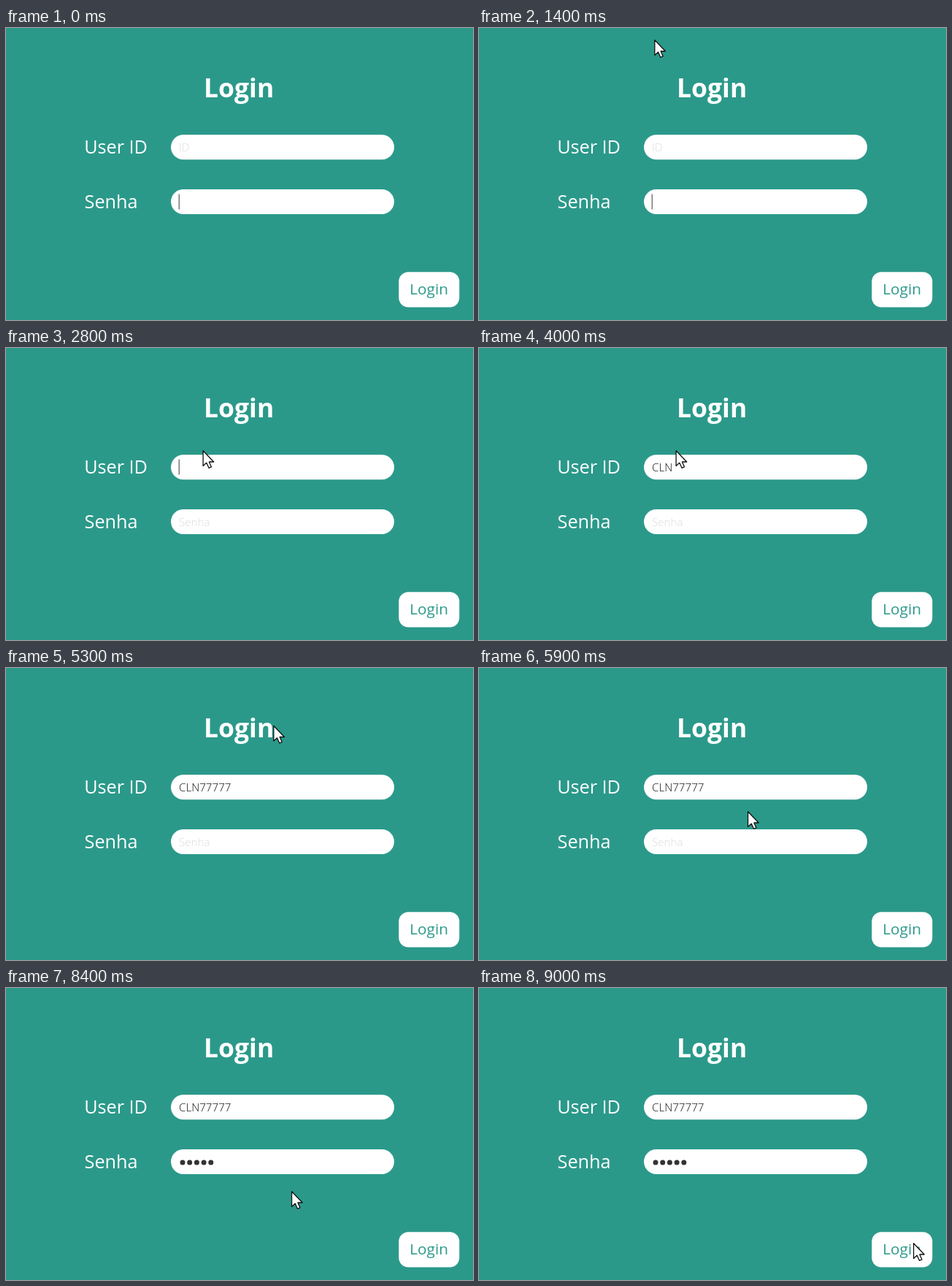
Animation of 640x400 px, one loop 9100 ms. Source, as an HTML page:

```html
<!DOCTYPE html>
<html lang="pt">
<head>
<meta charset="utf-8">
<title>Login</title>
<style>
  html, body { margin: 0; width: 100%; height: 100%; overflow: hidden; background: #2b998a; }
  svg { display: block; width: 640px; height: 400px; font-family: "Open Sans", "Noto Sans", sans-serif; }
  text { fill: #fff; white-space: pre; }
  .title { font-size: 35.5px; font-weight: 700; }
  .label { font-size: 25.2px; }
  .button { font-size: 20.8px; fill: #2b998a; }
  .value, .hint { font-size: 15.2px; font-weight: 300; }
  .value { fill: #111; }
  .hint { fill: #d9dedb; }
</style>
</head>
<body>
<svg viewBox="0 0 640 400">
  <rect width="640" height="400" fill="#2b998a"/>
  <text class="title" x="271" y="95">Login</text>
  <text class="label" x="107.2" y="172">User ID</text>
  <text class="label" x="107.6" y="246.5">Senha</text>
  <g fill="#fff">
    <rect x="226" y="146.3" width="306" height="34" rx="17"/>
    <rect x="226" y="221" width="306" height="34" rx="17"/>
    <rect x="538.3" y="334.3" width="83" height="48.2" rx="13"/>
  </g>
  <text class="button" x="553.2" y="365">Login</text>
  <text class="hint" id="idHint" x="237" y="169">ID</text>
  <text class="hint" id="passHint" x="237" y="244">Senha</text>
  <text class="value" id="idValue" x="237" y="169"></text>
  <g id="dots" fill="#333"></g>
  <rect id="caret" width="1.3" height="21" fill="#666"/>
  <g id="pointer">
    <path id="arrow" d="M.6 .8V21.6L5.3 17.3 8.6 24.4 12 22.9 8.9 16H15.2Z"
          fill="#fff" stroke="#111" stroke-width="1.3" stroke-linejoin="round"/>
    <path id="beam" d="M-4 -10H-1.2L0 -9 1.2 -10H4M0 -9V9M-4 10H-1.2L0 9 1.2 10H4"
          fill="none" stroke="#111" stroke-width="1.4"/>
  </g>
</svg>
<script>
const LOOP = 9100, STEP = 100, BLINK = 500;
const LETTERS = "CLN", DIGITS = "77777", DOT_GAP = 9.7;

// Evenly spaced key presses
const keys = (count, start, gap) => Array.from({ length: count }, (_, i) => start + i * gap);
const idKeys = [...keys(LETTERS.length, 3200, 150), ...keys(DIGITS.length, 4200, 200)];
const passKeys = keys(5, 7170, 125);

const idFocus = { from: 2500, to: 5000 };
const passFocus = { from: 6500, to: 8100 };

// The pointer rests between moves
const ENTRY = { end: 300, x: 11, y: 0 };
const MOVES = [
  { start: 300, end: 600, x: 191, y: 2 },
  { start: 1300, end: 1700, x: 506, y: 90 },
  { start: 1700, end: 2300, x: 275, y: 176 },
  { start: 2300, end: 2800, x: 269.5, y: 140 },
  { start: 5200, end: 5400, x: 463, y: 17 },
  { start: 5500, end: 5700, x: 572, y: 342 },
  { start: 5700, end: 5900, x: 368, y: 196 },
  { start: 5900, end: 6600, x: 368, y: 237 },
  { start: 8000, end: 8400, x: 391, y: 278 },
  { start: 8400, end: 9000, x: 595, y: 349 }
];

const el = id => document.getElementById(id);
const show = (node, on) => node.style.display = on ? "" : "none";
const typed = (times, t) => times.filter(time => time <= t).length;
const within = (t, span) => t >= span.from && t < span.to;
const ease = k => k * k * (3 - 2 * k);

const dots = passKeys.map((_, i) => {
  const dot = document.createElementNS("http://www.w3.org/2000/svg", "circle");
  dot.setAttribute("cx", 242 + i * DOT_GAP);
  dot.setAttribute("cy", 239);
  dot.setAttribute("r", 3.5);
  return el("dots").appendChild(dot);
});

function pointAt(t) {
  let { x, y } = ENTRY;
  for (const move of MOVES) {
    if (t <= move.start) break;
    const k = ease(Math.min(1, (t - move.start) / (move.end - move.start)));
    x += (move.x - x) * k;
    y += (move.y - y) * k;
  }
  return { x, y };
}

const overField = ({ x, y }) =>
  x > 226 && x < 532 && ((y > 146 && y < 180) || (y > 221 && y < 255));

// Each focus or key press restarts the blinking
function caretVisible(t) {
  const focused = t < idFocus.from || within(t, idFocus) || within(t, passFocus);
  const events = [0, idFocus.from, passFocus.from, ...idKeys, ...passKeys];
  const last = Math.max(...events.filter(time => time <= t));
  return focused && (t - last) % (2 * BLINK) < BLINK;
}

function draw(t) {
  const idCount = typed(idKeys, t), passCount = typed(passKeys, t);
  const inId = within(t, idFocus);

  el("idValue").textContent = (LETTERS + DIGITS).slice(0, idCount);
  dots.forEach((dot, i) => show(dot, i < passCount));
  show(el("idHint"), t < idFocus.from);
  show(el("passHint"), t >= idFocus.from && t < passFocus.from);

  const idWidth = idCount ? el("idValue").getComputedTextLength() : 0;
  el("caret").setAttribute("x", 236.6 + (inId ? idWidth : passCount * DOT_GAP));
  el("caret").setAttribute("y", inId ? 152.5 : 227.5);
  show(el("caret"), caretVisible(t));

  const point = pointAt(t);
  const beam = overField(point);
  show(el("pointer"), t >= ENTRY.end);
  show(el("beam"), beam);
  show(el("arrow"), !beam);
  el("pointer").setAttribute("transform", `translate(${point.x} ${point.y})`);
}

const start = performance.now();
function tick() {
  const t = (performance.now() - start) % LOOP;
  draw(Math.floor(t / STEP) * STEP);
  requestAnimationFrame(tick);
}
tick();
</script>
</body>
</html>
```
